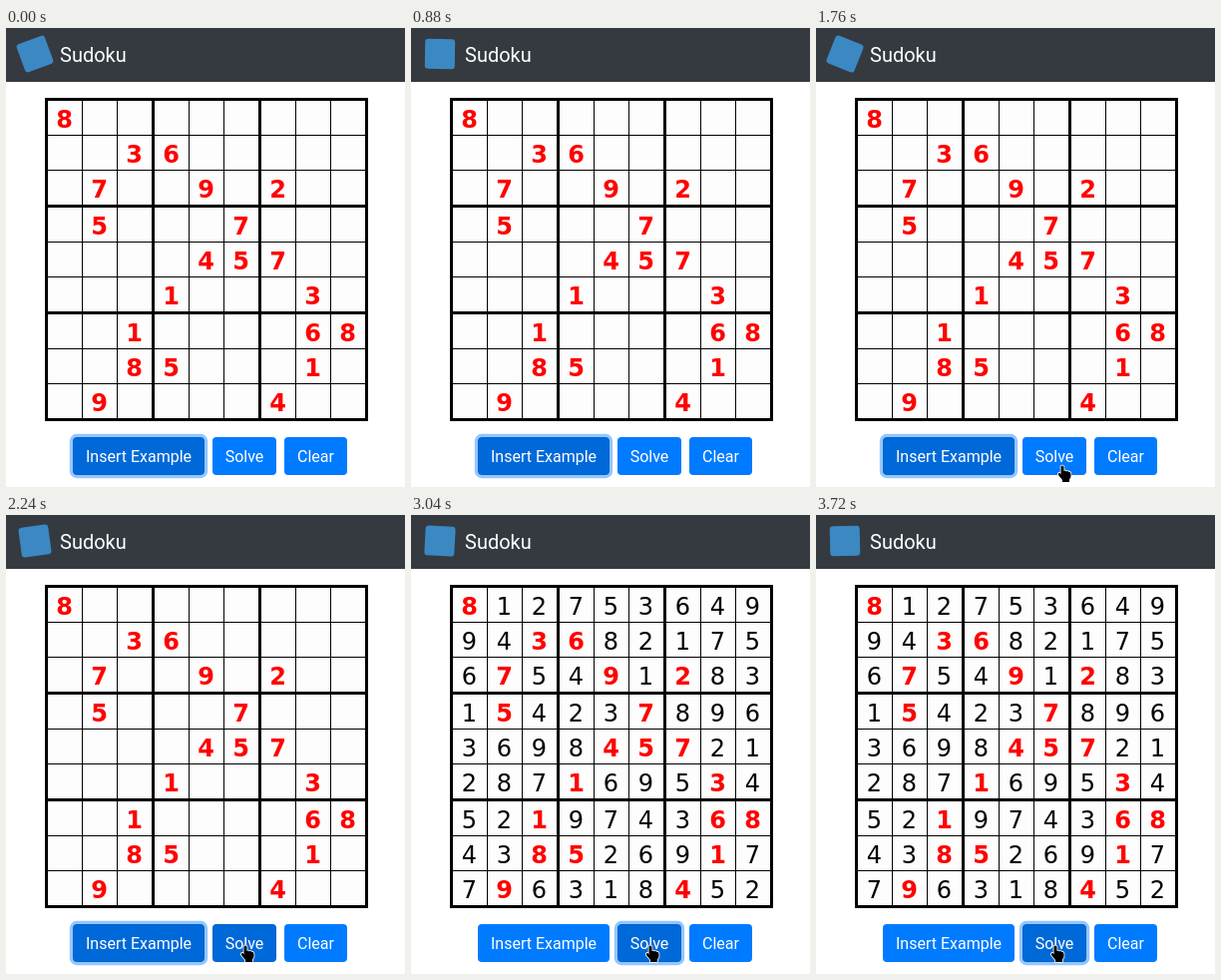
These frames come from a looping animation (400 px wide and 460 px high, 3.75 s). An HTML page with a canvas:

```html
<!DOCTYPE html>
<html lang="en">
<head>
<meta charset="utf-8">
<title>Sudoku</title>
<style>
  html, body { margin: 0; width: 400px; height: 460px; overflow: hidden; background: #fff; }
  canvas { display: block; }
</style>
</head>
<body>
<canvas id="stage" width="400" height="460"></canvas>
<script>
const ctx = document.getElementById('stage').getContext('2d');
const LOOP = 3750, STEP = 40;
const HOVER = 1760, PRESS = 2400, SOLVED = 2520;

const solution = [
  '812753649', '943682175', '675491283',
  '154237896', '369845721', '287169534',
  '521974368', '438526917', '796318452'
];
const givens = [
  '8........', '..36.....', '.7..9.2..',
  '.5...7...', '....457..', '...1...3.',
  '..1....68', '..85...1.', '.9....4..'
];

const BLUE = { fill: [0, 123, 255], edge: [0, 123, 255] };
const DARK = { fill: [0, 105, 217], edge: [0, 98, 204] };
const DOWN = { fill: [0, 98, 204], edge: [0, 92, 191] };

// Pointer path: time, x, y of the fingertip
const pointerPath = [
  [1640, 251, 457], [1680, 250, 449], [1720, 249, 442],
  [1760, 247, 438], [1880, 243, 434], [2040, 240, 431]
];

const lerp = (a, b, k) => a + (b - a) * k;
const mix = (a, b, k) => a.map((v, i) => lerp(v, b[i], k));
const mixStyle = (a, b, k) => ({ fill: mix(a.fill, b.fill, k), edge: mix(a.edge, b.edge, k) });
const rgb = c => `rgb(${c.map(Math.round)})`;

// 150 ms eased transition beginning at `start`
function fade(t, start) {
  const k = Math.min(1, Math.max(0, (t - start) / 150));
  return k * k * (3 - 2 * k);
}

function rect(x, y, w, h, color) {
  ctx.fillStyle = color;
  ctx.fillRect(x, y, w, h);
}

function roundRect(x, y, w, h, r, color) {
  ctx.fillStyle = color;
  ctx.beginPath();
  ctx.roundRect(x, y, w, h, r);
  ctx.fill();
}

function text(str, x, y, font, color, align = 'center') {
  ctx.font = font;
  ctx.fillStyle = color;
  ctx.textAlign = align;
  ctx.fillText(str, x, y);
}

function drawHeader(t) {
  rect(0, 0, 400, 54, '#343a40');
  ctx.save();
  ctx.translate(29, 26);
  ctx.rotate((160 + 0.126 * t) * Math.PI / 180);
  roundRect(-15, -15, 30, 30, 3.3, '#3b88c3');
  ctx.restore();
  text('Sudoku', 54, 34, '20px Roboto, sans-serif', '#fff', 'left');
}

function drawBoard(solved) {
  rect(39, 70, 324, 324, '#fdfdfd');
  for (let i = 0; i < 10; i++) {
    const thick = i % 3 === 0;
    const offset = Math.floor(i / 3) * 107 + (thick ? 0 : 2 + (i % 3) * 35);
    const width = thick ? 3 : 1;
    rect(39 + offset, 70, width, 324, '#000');
    rect(39, 70 + offset, 324, width, '#000');
  }
  const center = i => 19.5 + i * 35 + Math.floor(i / 3) * 2;
  for (let row = 0; row < 9; row++) {
    for (let col = 0; col < 9; col++) {
      const given = givens[row][col] !== '.';
      if (!given && !solved) continue;
      text(solution[row][col], 39 + center(col), 80.5 + center(row),
        `${given ? 'bold ' : ''}24px "DejaVu Sans", sans-serif`, given ? '#f00' : '#000');
    }
  }
}

function drawButton(label, x, w, style, focus) {
  if (focus > 0) {
    const s = 3.2 * focus;
    ctx.fillStyle = `rgba(38,143,255,${0.5 * focus})`;
    ctx.beginPath();
    ctx.roundRect(x - s, 410 - s, w + 2 * s, 38 + 2 * s, 4 + s);
    ctx.roundRect(x, 410, w, 38, 4);
    ctx.fill('evenodd');
  }
  roundRect(x, 410, w, 38, 4, rgb(style.edge));
  roundRect(x + 1, 411, w - 2, 36, 3, rgb(style.fill));
  text(label, x + w / 2, 435, '16px Roboto, sans-serif', '#fff');
}

function drawButtons(t) {
  const moved = fade(t, PRESS);
  let solve = mixStyle(BLUE, DARK, fade(t, HOVER));
  solve = mixStyle(solve, DOWN, moved);
  solve = mixStyle(solve, DARK, fade(t, SOLVED));
  drawButton('Insert Example', 67, 132, mixStyle(DARK, BLUE, moved), 1 - moved);
  drawButton('Solve', 207, 64, solve, moved);
  drawButton('Clear', 279, 63, BLUE, 0);
}

const hand = new Path2D(
  'M-1.5 1.5 Q0 -0.5 1.5 1.5 V6 Q3 5 4 6.5 Q5.5 5.5 6.5 7 Q8.5 6.5 8.5 9' +
  ' V12 L7 14.5 V17 H0 V15 L-4 10 Q-4.5 7.5 -2.5 8 L-1.5 9.5 Z');

function drawPointer(t) {
  if (t < pointerPath[0][0]) return;
  let [, x, y] = pointerPath[pointerPath.length - 1];
  const next = pointerPath.findIndex(p => p[0] > t);
  if (next > 0) {
    const a = pointerPath[next - 1], b = pointerPath[next];
    const k = (t - a[0]) / (b[0] - a[0]);
    x = lerp(a[1], b[1], k);
    y = lerp(a[2], b[2], k);
  }
  ctx.save();
  ctx.translate(x, y);
  ctx.lineJoin = 'round';
  ctx.lineWidth = 1.6;
  ctx.strokeStyle = '#fff';
  ctx.stroke(hand);
  ctx.fillStyle = '#000';
  ctx.fill(hand);
  ctx.restore();
}

function draw(now) {
  const t = Math.floor((now % LOOP) / STEP) * STEP;
  rect(0, 0, 400, 460, '#fff');
  drawHeader(t);
  drawBoard(t >= SOLVED);
  drawButtons(t);
  drawPointer(t);
  requestAnimationFrame(draw);
}
requestAnimationFrame(draw);
</script>
</body>
</html>
```
